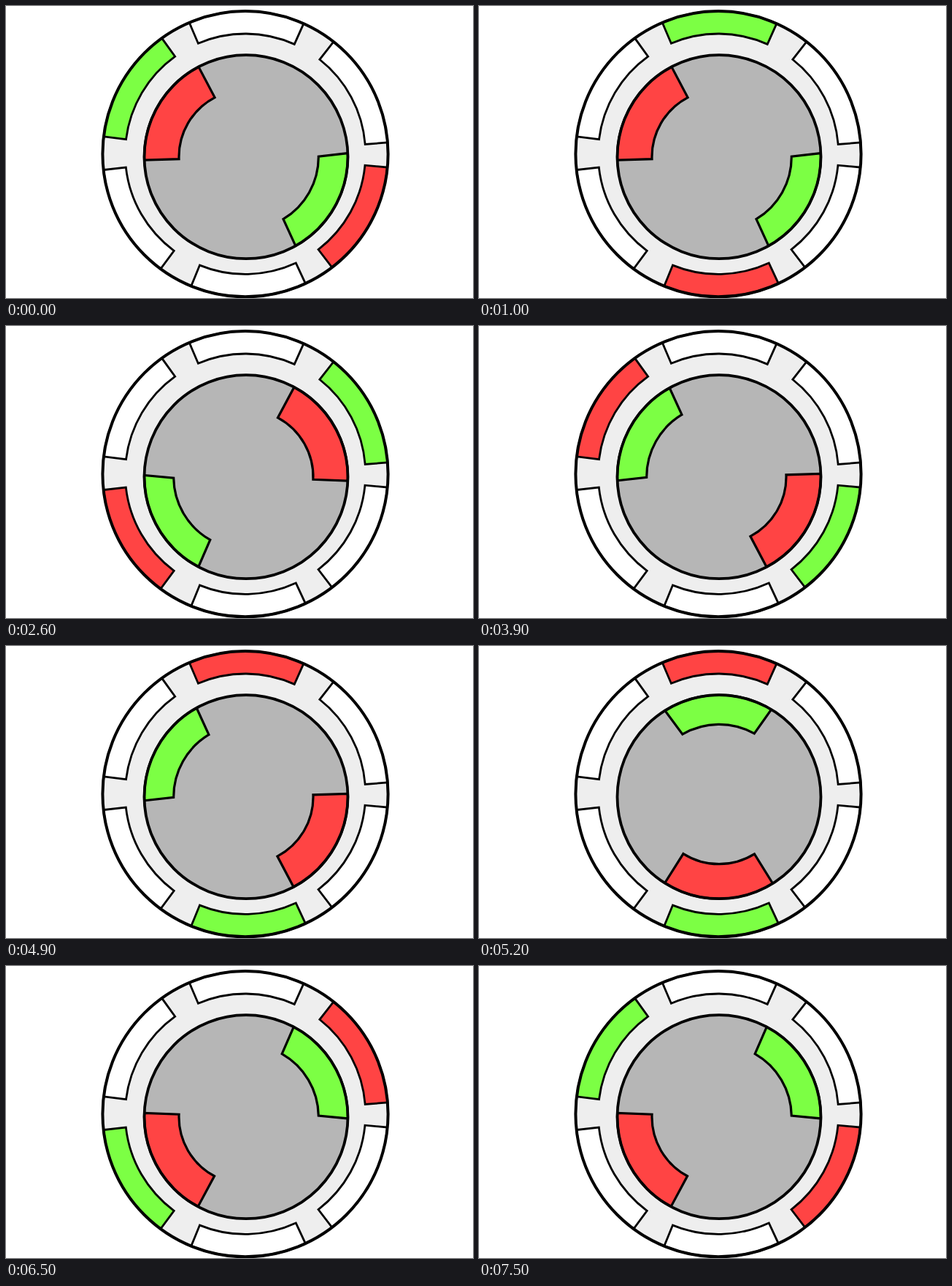
Write an HTML page that moves like this. It is 640x400 px and loops after 7800 ms.

```html
<!DOCTYPE html>
<html lang="en">
<head>
<meta charset="utf-8">
<title>Motor</title>
<style>
  html, body { margin: 0; width: 100%; height: 100%; overflow: hidden; background: #fff; }
  svg { display: block; width: 100%; height: 100%; }
  path, circle { stroke: #000; stroke-linejoin: miter; }
</style>
</head>
<body>
<svg viewBox="0 0 640 400">
  <g transform="translate(328 202.7)">
    <circle r="196" fill="#eee" stroke="none"/>
    <g id="slots" stroke-width="2.8"></g>
    <circle r="195.6" fill="none" stroke-width="4"/>
  </g>
  <g transform="translate(329 206.7)">
    <circle r="139.5" fill="#b6b6b6" stroke="none"/>
    <g id="rotor" stroke-width="3.2"></g>
    <circle r="139.5" fill="none" stroke-width="3.8"/>
  </g>
</svg>
<script>
const RED = '#ff4444', GREEN = '#7cff44', WHITE = '#fff';
const STEP = 1300, LEAD = 300, COUNT = 6;
const STATOR_R = 195.6, ROTOR_R = 139.5;

// Point on a circle, degrees clockwise from the top.
function polar(r, deg) {
  const a = deg * Math.PI / 180;
  return `${(r * Math.sin(a)).toFixed(2)} ${(-r * Math.cos(a)).toFixed(2)}`;
}

// Ring segment around the angle mid; half and innerHalf are half-widths in degrees.
function segment(parent, fill, mid, outer, inner, half, innerHalf = half) {
  const p = document.createElementNS('http://www.w3.org/2000/svg', 'path');
  p.setAttribute('d',
    `M${polar(outer, mid - half)}A${outer} ${outer} 0 0 1 ${polar(outer, mid + half)}` +
    `L${polar(inner, mid + innerHalf)}A${inner} ${inner} 0 0 0 ${polar(inner, mid - innerHalf)}Z`);
  p.setAttribute('fill', fill);
  parent.appendChild(p);
  return p;
}

const slotGroup = document.getElementById('slots');
const rotor = document.getElementById('rotor');

// Slot centres, clockwise from the upper left.
const slots = [-59.4, 0.5, 61.8, 119, 178.7, 240]
  .map(mid => segment(slotGroup, WHITE, mid, STATOR_R, 164.7, 23.6));

segment(rotor, RED, 0.2, ROTOR_R, 92, 32);
segment(rotor, GREEN, 179.4, ROTOR_R, 99.3, 31.5, 29.7);

// The stator switches first; the rotor follows LEAD ms later.
function draw(t) {
  const active = Math.floor((t + LEAD) / STEP) % COUNT;
  const pose = Math.floor(t / STEP) % COUNT;
  slots.forEach((slot, i) => {
    const fill = i === active ? GREEN : i === (active + 3) % COUNT ? RED : WHITE;
    slot.setAttribute('fill', fill);
  });
  rotor.setAttribute('transform', `rotate(${(pose - 1) * 60})`);
}

const start = performance.now();
function tick() {
  draw((performance.now() - start) % (STEP * COUNT));
  requestAnimationFrame(tick);
}
tick();
</script>
</body>
</html>
```
